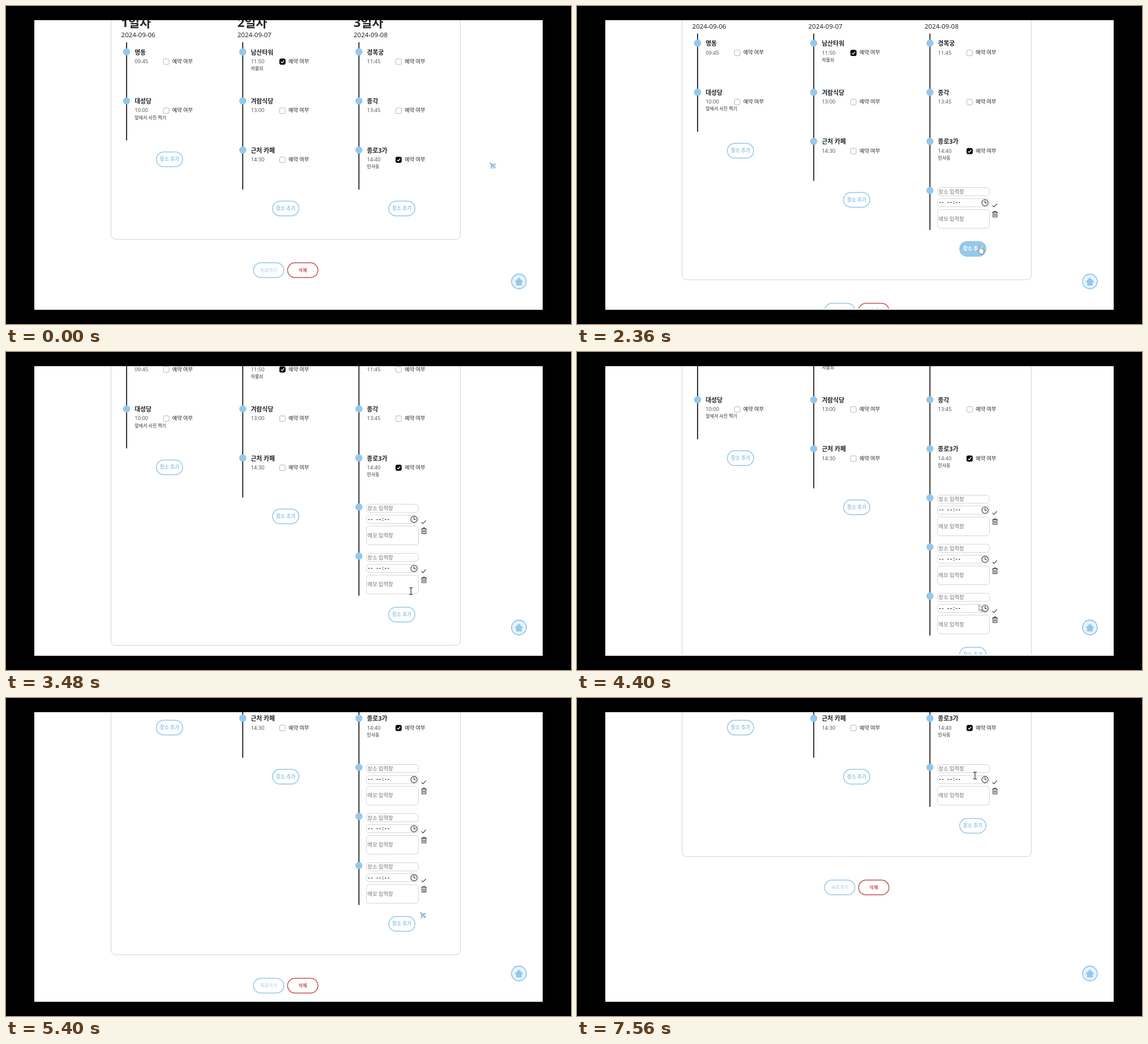
These frames come from a looping animation (998x561 px, 7600 ms). An HTML page:

```html
<!DOCTYPE html>
<html lang="ko">
<head>
<meta charset="utf-8">
<title>여행 일정</title>
<style>
  html, body { margin: 0; width: 100%; height: 100%; overflow: hidden; background: #000; }
  svg { display: block; width: 998px; height: 561px; }
  text { font-family: "Noto Sans", "Noto Sans CJK KR", sans-serif; fill: #212529; }
  .title { font-size: 21.8px; font-weight: 700; }
  .date { font-size: 11.5px; }
  .name { font-size: 10.8px; font-weight: 700; }
  .time { font-size: 9.4px; fill: #5c5c5c; }
  .label { font-size: 9.2px; font-weight: 500; }
  .memo { font-size: 8px; font-weight: 700; fill: #777; }
  .hint { font-size: 9.3px; fill: #70757a; }
  .clock { font: 600 8.2px "Noto Sans Mono", monospace; fill: #222; white-space: pre; }
  .pill rect { fill: #fff; stroke: #94c8ec; stroke-width: 1.5; }
  .pill text { font-size: 8.7px; font-weight: 700; fill: #94c8ec; text-anchor: middle; }
  .pill.small text { font-size: 8px; font-weight: 500; }
  .pill.hover rect { fill: #94c8ec; }
  .pill.hover text { fill: #fff; }
  .pill.red rect { stroke: #c4544f; }
  .pill.red text { fill: #c4544f; font-weight: 700; }
  .field { fill: #fff; stroke: #d3d3d3; }
  .icon { fill: none; stroke: #333; stroke-width: 1.1; stroke-linecap: round; stroke-linejoin: round; }
</style>
</head>
<body>
<svg id="stage" viewBox="0 0 998 561">
  <clipPath id="view"><rect x="50" y="25" width="898" height="511"/></clipPath>
  <rect width="998" height="561"/>
  <g clip-path="url(#view)">
    <rect x="50" y="25" width="898" height="511" fill="#fff"/>
    <g id="page"></g>
    <rect x="50" y="533.5" width="898" height="2.5" fill="#e9f5f1"/>
    <circle cx="906" cy="486" r="13" fill="#e8f3fb" stroke="#94c8ec" stroke-width="1.8"/>
    <path d="M906 479L914 487H911V493H901V487H898Z" fill="#94c8ec"/>
    <g id="pointer">
      <path id="plane" fill="#94bfdf" transform="translate(6 6) rotate(-45) scale(.88)"
        d="M0 -7.5Q1.6 -7 1.6 -5V-2L7 2V4L1.6 2.6V5L3.4 6.6V8L0 7.2L-3.4 8V6.6L-1.6 5V2.6L-7 4V2L-1.6 -2V-5Q-1.6 -7 0 -7.5Z"/>
      <path id="arrow" fill="#fff" stroke="#777" stroke-width=".9"
        d="M0 0V10.6L2.5 8.4L4.3 12.5L6.1 11.7L4.3 7.7H7.7Z"/>
      <path id="beam" fill="none" stroke="#333" stroke-width="1.2"
        d="M-3 -6H-1Q0 -6 0 -5V5Q0 6 -1 6H-3M3 -6H1Q0 -6 0 -5M3 6H1Q0 6 0 5"/>
      <path id="hand" fill="#fff" stroke="#666" stroke-width=".9" stroke-linejoin="round"
        d="M-1.1 .9Q0 -.9 1.1 .9V5.2Q2.3 4.3 3.1 5.6Q4.4 4.8 5.1 6.1Q6.8 5.7 7 7.2V10.3Q6.7 12 5.9 12.8V14.8H-.2V13.4L-3.6 9Q-3.6 7.3 -1.1 8.8Z"/>
    </g>
  </g>
</svg>
<script>
const LOOP = 7600, GLIDE = 400, SCROLL = 300, CLICK = 160;
const TOP = 64, STEP = 86.6, FIRST = 213, PITCH = 205.2;
const colX = i => FIRST + PITCH * i;
const lineEnd = rows => TOP + STEP * rows;
const dotY = row => lineEnd(row) + 16.9;
const ADD_X = 75.8, ADD_Y = 33.4, LAST = colX(2);

const days = [
  [["명동", "09:45"], ["대성당", "10:00", 0, "앞에서 사진 찍기"]],
  [["남산타워", "11:50", 1, "자물쇠"], ["겨람식당", "13:00"], ["근처 카페", "14:30"]],
  [["경복궁", "11:45"], ["종각", "13:45"], ["종로3가", "14:40", 1, "인사동"]]
];

// Each scroll starts at a time and moves the page by an amount.
const scrolls = [[300, 15.3], [2760, 31.7], [3320, 36.3], [4420, 120.7], [4840, 14.4]];

// Pointer stops: arrival time, place, and how many forms a click there adds.
const stops = [
  [0, 853, 275, 0], [760, 694, 350.5, 1], [1560, 697, 380, 0], [2400, 712, 424, 1],
  [3120, 716, 419, 0], [3800, 710, 445.8, 1], [4800, 721.5, 416.5, 0], [5600, 738, 337, -1],
  [6140, 748, 262, 0], [6400, 738, 250, -1], [6880, 738, 164, 0], [7520, 703, 136.8, 0]
];

const $ = id => document.getElementById(id);
const page = $("page");

function add(parent, tag, attrs, text) {
  const el = document.createElementNS("http://www.w3.org/2000/svg", tag);
  for (const k in attrs) el.setAttribute(k, attrs[k]);
  if (text) el.textContent = text;
  return parent.appendChild(el);
}
const write = (p, cls, x, y, text) => add(p, "text", { class: cls, x, y, dy: ".37em" }, text);
const shift = (el, x, y) => el.setAttribute("transform", `translate(${x} ${y})`);
const show = (el, on) => el.style.display = on ? "" : "none";

function dot(x, y) {
  const g = add(page, "g", {});
  shift(g, x, y);
  add(g, "circle", { r: 6.3, fill: "#94c8ec" });
  return g;
}

function pill(cls, width, text) {
  const g = add(page, "g", { class: "pill " + cls });
  add(g, "rect", { x: -width / 2, y: -13, width, height: 26, rx: 13 });
  write(g, "", 0, -.4, text);
  return g;
}

function place(x, y, [name, time, booked, memo]) {
  const g = dot(x, y);
  write(g, "name", 14.2, .6, name);
  write(g, "time", 14.2, 16.5, time);
  add(g, "rect", { x: 65.2, y: 12.3, width: 9.8, height: 9.8, rx: 2,
    fill: booked ? "#000" : "#fff", stroke: booked ? "#000" : "#b4b4bb" });
  if (booked) add(g, "path", { d: "M67.6 17.4L69.5 19.3L73 15", fill: "none", stroke: "#fff", "stroke-width": 1.4 });
  write(g, "label", 80.8, 16.5, "예약 여부");
  if (memo) write(g, "memo", 14.2, 29.2, memo);
}

function form(row) {
  const g = dot(LAST, dotY(row));
  const field = (y, height) => add(g, "rect", { class: "field", x: 13.3, y, width: 91.8, height, rx: 5 });
  field(-4.9, 14.4);
  field(14.4, 14.4);
  field(33.6, 33);
  write(g, "hint", 15.2, 2.3, "장소 입력창");
  write(g, "clock", 15.2, 21, "-- --:--");
  write(g, "hint", 15.2, 49.7, "메모 입력창");
  add(g, "circle", { class: "icon", cx: 97.3, cy: 21.7, r: 5.6 });
  add(g, "path", { class: "icon", d: "M97.3 18V22H100M110.8 26.8L113.2 29.2L118 23.8" });
  add(g, "path", { class: "icon", d: "M110.4 38.5H119.4M113.2 38.4V36.8H116.6V38.4M111.4 38.7V46.9H118.4V38.7M113.8 41V44.6M116 41V44.6" });
  return g;
}

const card = add(page, "rect", { x: 185.7, y: -400, width: 616.8, rx: 8, fill: "none", stroke: "#d2d2d2" });
const columns = days.map((places, i) => {
  const x = colX(i);
  write(page, "title", x - 9.4, 28.5, i + 1 + "일차");
  write(page, "date", x - 9.4, 51.2, "2024-09-0" + (6 + i));
  const line = add(page, "rect", { x: x - .9, y: TOP, width: 1.8, fill: "#1c1c1c" });
  places.forEach((p, row) => place(x, dotY(row), p));
  const more = pill("", 46.4, "장소 추가");
  return { x, line, more, rows: places.length };
});
const forms = [3, 4, 5].map(form);
const back = pill("small", 53.6, "뒤로가기");
const remove = pill("small red", 53.6, "삭제");

function ease(p) {
  p = Math.min(1, Math.max(0, p));
  return p * p * (3 - 2 * p);
}

function setRows({ x, line, more }, rows) {
  line.setAttribute("height", STEP * rows);
  shift(more, x + ADD_X, lineEnd(rows) + ADD_Y);
}
columns.forEach(c => setRows(c, c.rows));

function pointerAt(t) {
  let [, x, y] = stops[0];
  for (const [at, nx, ny] of stops.slice(1)) {
    const e = ease((t - at) / GLIDE + 1);
    x += (nx - x) * e;
    y += (ny - y) * e;
  }
  return [x, y];
}

// The pointer's look follows from what lies below it.
function targetAt(x, y, rows) {
  if (Math.abs(x - LAST - ADD_X) < 23.5 && Math.abs(y - lineEnd(rows) - ADD_Y) < 13) return "add";
  const row = Math.floor((y - dotY(0) + 5) / STEP);
  const dx = x - LAST, dy = y - dotY(row);
  if (row < 3 || row >= rows) return "page";
  if (dx > 109 && dx < 120 && dy > 22 && dy < 48) return "icon";
  if (dx < 13 || dx > 105 || dy > 67) return "page";
  return dy > 14.6 && dy < 30 ? "time" : "text";
}
const looks = { add: "hand", icon: "hand", time: "arrow", text: "beam", page: "plane" };

function draw(t) {
  const scroll = scrolls.reduce((sum, [at, by]) => sum + by * ease((t - at) / SCROLL), 0);
  const count = stops.reduce((sum, [at, , , by]) => sum + (t >= at + CLICK ? by : 0), 0);
  const rows = 3 + count, end = lineEnd(rows);
  shift(page, 0, -scroll);
  setRows(columns[2], rows);
  card.setAttribute("height", end + 487.8);
  shift(back, 464, end + 142.3);
  shift(remove, 524.2, end + 142.3);
  forms.forEach((f, k) => show(f, k < count));

  const [x, y] = pointerAt(t), target = targetAt(x, y + scroll, rows);
  columns[2].more.classList.toggle("hover", target === "add");
  shift($("pointer"), x, y);
  for (const look of new Set(Object.values(looks))) show($(look), look === looks[target]);
}

const start = performance.now();
function frame() {
  draw((performance.now() - start) % LOOP);
  requestAnimationFrame(frame);
}
frame();
</script>
</body>
</html>
```
